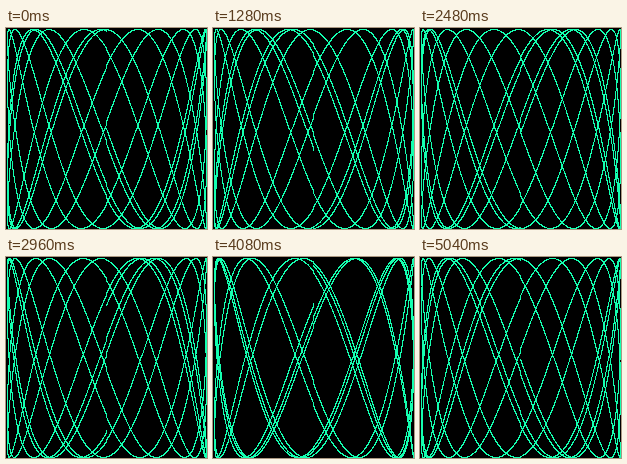
These frames come from a looping animation (201x201 px, 5.12 s). An HTML page with a canvas:

```html
<!DOCTYPE html>
<html lang="en">
<head>
<meta charset="utf-8">
<title>Lissajous</title>
<style>
  html, body { margin: 0; width: 100%; height: 100%; overflow: hidden; background: #000; }
  canvas { display: block; width: 201px; height: 201px; image-rendering: pixelated; }
</style>
</head>
<body>
<canvas id="stage" width="201" height="201"></canvas>
<script>
  const RADIUS = 100;
  const SIZE = 2 * RADIUS + 1;
  const CYCLES = 5;
  const STEP = 0.001;
  const FREQ = 2.7561;
  const STEPS = 64;
  const DELAY = 80;
  const PHASE_STEP = 0.1;

  const ctx = document.getElementById('stage').getContext('2d');
  ctx.fillStyle = '#14ffb0';

  // Rounds by truncating toward zero, so the curve never touches row or column 0.
  const toPixel = v => RADIUS + Math.trunc(v * RADIUS + 0.5);

  function draw(phase) {
    const seen = new Uint8Array(SIZE * SIZE);
    ctx.clearRect(0, 0, SIZE, SIZE);
    for (let t = 0; t < CYCLES * 2 * Math.PI; t += STEP) {
      const x = toPixel(Math.sin(t));
      const y = toPixel(Math.sin(t * FREQ + phase));
      const i = y * SIZE + x;
      if (seen[i]) continue;
      seen[i] = 1;
      ctx.fillRect(x, y, 1, 1);
    }
  }

  const start = performance.now();
  let shown = -1;

  function tick() {
    const step = Math.floor((performance.now() - start) / DELAY) % STEPS;
    if (step !== shown) {
      shown = step;
      draw(step * PHASE_STEP);
    }
    requestAnimationFrame(tick);
  }
  tick();
</script>
</body>
</html>
```
